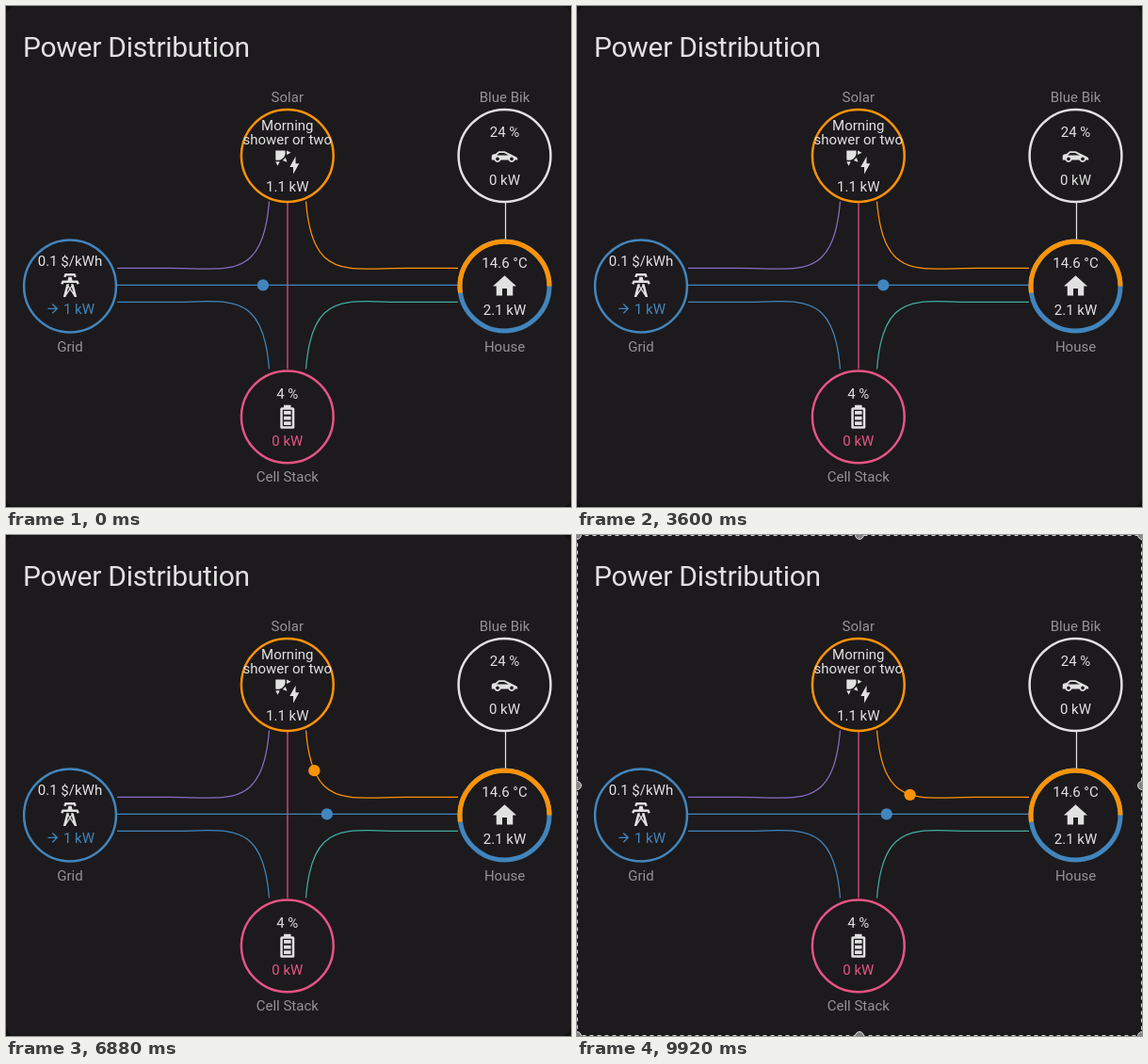
An HTML page that plays this animation: 600 px wide and 532 px high, repeating every 9960 ms.

```html
<!DOCTYPE html>
<html lang="en">
<head>
<meta charset="utf-8">
<title>Power Distribution</title>
<style>
  :root {
    --text: #e1e1e1; --blue: #4285bd; --orange: #ff9305;
    --pink: #e75483; --purple: #8a6cc6; --teal: #42aca1;
  }
  html, body { margin: 0; width: 100%; height: 100%; overflow: hidden; background: #131213; }
  svg { display: block; }
  text { font: 15px Roboto, sans-serif; fill: var(--text); text-anchor: middle; }
  .title { font-size: 30px; letter-spacing: -.28px; text-anchor: start; }
  .label { fill: #959395; }
  .ring { fill: none; stroke-width: 2.5; }
  .flow path { fill: none; stroke-width: 1.25; vector-effect: non-scaling-stroke; }
  .icon { fill: var(--text); }
</style>
</head>
<body>
<svg width="600" height="532" viewBox="0 0 600 532">
  <rect width="600" height="532" rx="11" fill="#1c1a1c"/>
  <text class="title" x="18" y="53.5">Power Distribution</text>

  <svg class="flow" x="118" y="207.4" width="362" height="178" viewBox="0 0 100 100"
       preserveAspectRatio="xMidYMid slice">
    <path id="solarHome" stroke="var(--orange)" d="M55,0v15c0,35 10,30 30,30h20"/>
    <path stroke="var(--purple)" d="M45,0v15c0,35 -10,30 -30,30h-20"/>
    <path stroke="var(--teal)" d="M55,100v-15c0,-35 10,-30 30,-30h20"/>
    <path stroke="var(--blue)" d="M45,100v-15c0,-35 -10,-30 -30,-30h-20"/>
    <path stroke="var(--pink)" d="M50,0V100"/>
    <path id="gridHome" stroke="var(--blue)" d="M0,50H100"/>
    <circle id="solarDot" r="1.7" fill="var(--orange)"/>
    <circle id="gridDot" r="1.7" fill="var(--blue)"/>
  </svg>
  <path d="M530.5,209V248" stroke="var(--text)" stroke-width="1.25"/>

  <g class="ring">
    <circle cx="298.8" cy="159" r="48.9" stroke="var(--orange)"/>
    <circle cx="529.5" cy="159" r="48.9" stroke="var(--text)"/>
    <circle cx="68" cy="297.5" r="48.9" stroke="var(--blue)"/>
    <circle cx="298.8" cy="436.3" r="48.9" stroke="var(--pink)"/>
    <g stroke-width="5" style="stroke-width:5">
      <circle cx="529.5" cy="297.5" r="47.5" stroke="var(--blue)"/>
      <path d="M577,297.5A47.5,47.5 0 1 0 482.5,304.6" stroke="var(--orange)"/>
    </g>
  </g>

  <text class="label" x="298.8" y="102">Solar</text>
  <text class="label" x="529.5" y="102">Blue Bik</text>
  <text class="label" x="68" y="366.5">Grid</text>
  <text class="label" x="529.5" y="366.5">House</text>
  <text class="label" x="298.8" y="505">Cell Stack</text>

  <text x="298.8" y="132.3">Morning</text>
  <text x="298.8" y="147.3">shower or two</text>
  <text x="298.8" y="197">1.1 kW</text>
  <text x="529.5" y="139.4">24 %</text>
  <text x="529.5" y="189.8">0 kW</text>
  <text x="68" y="276.4">0.1 $/kWh</text>
  <text x="77.5" y="326.6" style="fill:var(--blue)">1 kW</text>
  <text x="529.5" y="278">14.6 °C</text>
  <text x="529.5" y="328.4">2.1 kW</text>
  <text x="298.8" y="416.8">4 %</text>
  <text x="298.8" y="467.2" style="fill:var(--pink)">0 kW</text>

  <g class="icon">
    <path transform="translate(283.8 151) scale(1.25)" d="M11.45,2V5.55L15,3.77L11.45,2M10.45,8L8,10.46L11.75,11.71L10.45,8M2,11.45L3.77,15L5.55,11.45H2M10,2H2V10C2.57,10.17 3.17,10.25 3.77,10.25C7.35,10.26 10.26,7.35 10.27,3.75C10.26,3.16 10.17,2.57 10,2M17,22V16H14L19,7V13H22L17,22Z"/>
    <path transform="translate(514.5 143.6) scale(1.25)" fill-rule="evenodd" d="M12,8.5H7L4,11H3C1.89,11 1,11.89 1,13V16H3.17A3,3 0 0 0 8.82,16H15.17A3,3 0 0 0 20.82,16H23V15C23,13.89 21.97,13.53 21,13L12,8.5M5.25,12L7.5,10H11.5L15.5,12H5.25M6,13.5a1.5,1.5 0 1 1 0,3a1.5,1.5 0 1 1 0,-3M18,13.5a1.5,1.5 0 1 1 0,3a1.5,1.5 0 1 1 0,-3"/>
    <path transform="translate(53 281.5) scale(1.25)" fill-rule="evenodd" d="M8.28,5.45L6.5,4.55L7.76,2H16.23L17.5,4.55L15.72,5.44L15,4H9L8.28,5.45M18.62,8H14.09L13.3,5H10.7L9.91,8H5.38L4.1,10.55L5.89,11.44L6.62,10H17.38L18.1,11.45L19.89,10.56L18.62,8M17.77,22H15.7L15.46,21.1L12,15.9L8.53,21.1L8.3,22H6.23L9.12,11H11.19L10.83,12.35L12,14.1L13.16,12.35L12.81,11H14.88L17.77,22M11.4,15L10.5,13.65L9.32,18.13L11.4,15M14.68,18.12L13.5,13.64L12.6,15L14.68,18.12Z"/>
    <path transform="translate(514.5 282.6) scale(1.25)" d="M10,20V14H14V20H19V12H22L12,3L2,12H5V20H10Z"/>
    <path transform="translate(283.8 421.3) scale(1.25)" fill-rule="evenodd" d="M16,20H8V6H16M16.67,4H15V2H9V4H7.33C6.6,4 6,4.6 6,5.33V20.67C6,21.4 6.6,22 7.33,22H16.67C17.41,22 18,21.41 18,20.67V5.33C18,4.6 17.4,4 16.67,4M15,16H9V19H15V16M15,7H9V10H15V7M15,11.5H9V14.5H15V11.5Z"/>
    <path transform="translate(41.7 313.2) scale(.68)" fill="var(--blue)" d="M4,11V13H16L10.5,18.5L11.92,19.92L19.84,12L11.92,4.08L10.5,5.5L16,11H4Z"/>
  </g>

  <g id="frame" visibility="hidden">
    <g fill="none">
      <rect x=".5" y=".5" width="599" height="531" stroke="#111"/>
      <rect x=".5" y=".5" width="599" height="531" stroke="#d4d4d4" stroke-dasharray="4 4"/>
    </g>
    <g id="handles" fill="#858585" stroke="#d8d8d8"></g>
  </g>
</svg>
<script>
  const LOOP = 9960, STEP = 40, FRAME_AT = 8520;
  const $ = id => document.getElementById(id);
  const frac = v => v - Math.floor(v);

  for (const x of [0, 300, 600])
    for (const y of [0, 266, 532]) {
      if (x === 300 && y === 266) continue;
      const c = document.createElementNS('http://www.w3.org/2000/svg', 'circle');
      c.setAttribute('cx', x);
      c.setAttribute('cy', y);
      c.setAttribute('r', 4.5);
      $('handles').append(c);
    }

  const solarLen = $('solarHome').getTotalLength();
  const stops = [0, 15, solarLen - 20, solarLen];

  // Each path segment takes an equal share of the cycle.
  function solarDistance(p) {
    const i = Math.min(2, Math.floor(p * 3));
    return stops[i] + (stops[i + 1] - stops[i]) * (p * 3 - i);
  }

  function place(dot, path, distance) {
    const { x, y } = path.getPointAtLength(distance);
    dot.setAttribute('cx', x);
    dot.setAttribute('cy', y);
  }

  function draw() {
    const t = Math.floor(performance.now() % LOOP / STEP) * STEP;
    place($('gridDot'), $('gridHome'), 100 * frac((t + 1346) / 3145));
    place($('solarDot'), $('solarHome'), solarDistance(frac(.82 + (t - 2160) / 2852)));
    $('frame').setAttribute('visibility', t >= FRAME_AT ? 'visible' : 'hidden');
    requestAnimationFrame(draw);
  }
  draw();
</script>
</body>
</html>
```
